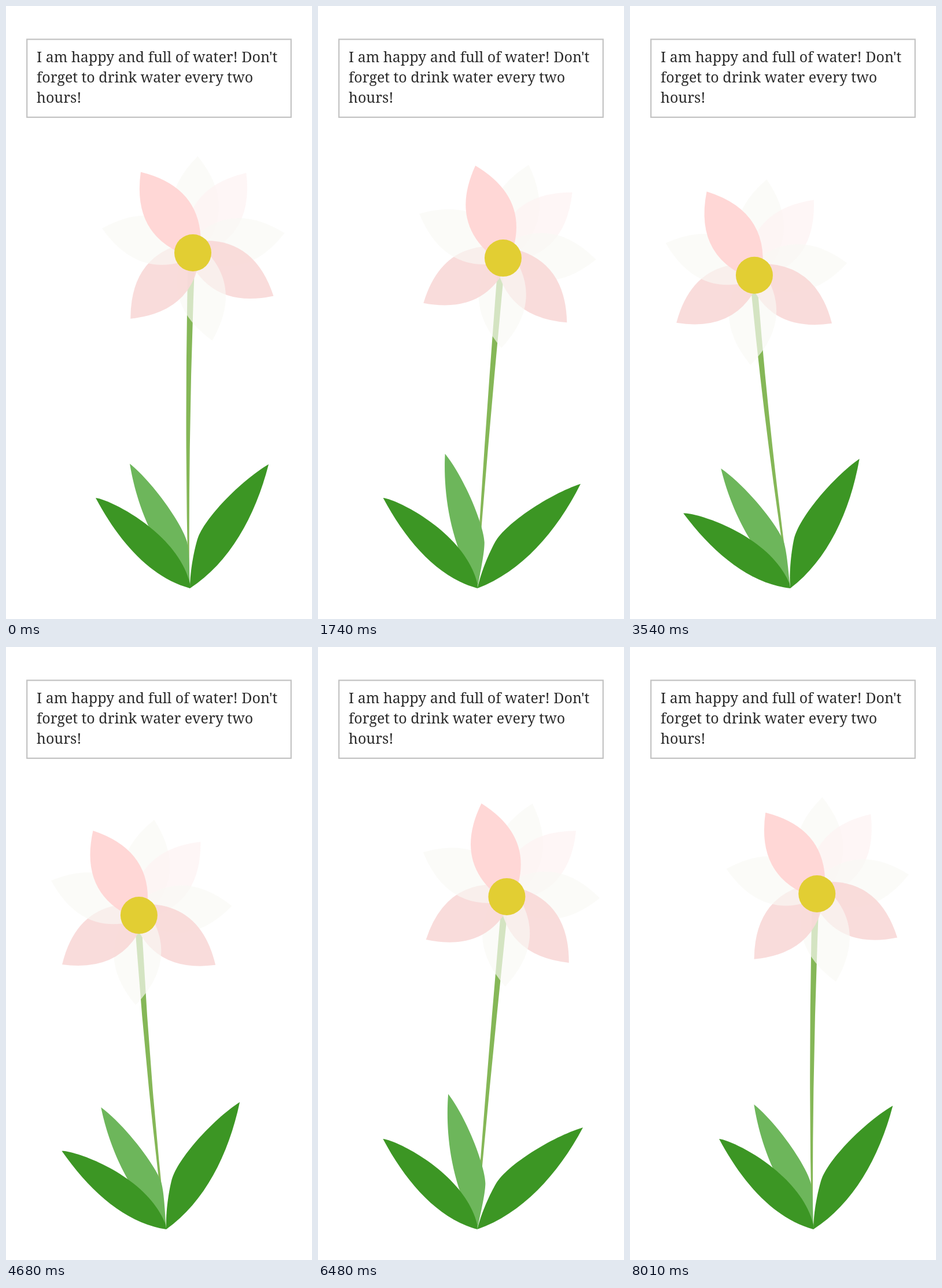
These frames come from a looping animation (529x1058 px, 8.04 s). An HTML page:

```html
<!DOCTYPE html>
<html lang="en">
<head>
<meta charset="utf-8">
<title>Happy flower</title>
<style>
  html, body { margin: 0; width: 100%; height: 100%; overflow: hidden; background: #fff; }
  svg { display: block; width: 100%; height: 100%; }
  text { font: 25px "Noto Serif", serif; fill: #2b2b2b; }
</style>
</head>
<body>
<svg id="stage" viewBox="0 0 529 1058">
  <rect x="36.2" y="57.5" width="456.6" height="134.5" fill="#fff" stroke="#c2c2c2" stroke-width="2.2"/>
  <text x="53" y="97">I am happy and full of water! Don't</text>
  <text x="53" y="132">forget to drink water every two</text>
  <text x="53" y="167">hours!</text>
</svg>
<script>
const LOOP = 8040, STEP = 30, GROUND = 1005;
const stage = document.getElementById("stage");

// Four evenly spaced key poses, played there and back; angles in degrees.
const keys = {
  x: [323, 334.3, 286.2, 175.2],  // flower centre
  y: [426, 425.8, 457, 469],
  foot: [318, 275, 277, 277],
  sway: [0, 15.4, 4.9, -9.4],     // leaves
  lean: [0, 13, 13, 0],           // all petals
  kick: [0, 7, -4, 0],            // pink petals only
  drag: [0, 0, 0, 21]             // hanging petals only
};

const white = { fill: "#f9f9f5", alpha: 0.68 };
const blush = { fill: "#fef3f2", alpha: 0.7 };
const rose = { fill: "#f9dad9", alpha: 0.93, kicks: true };
const pink = { fill: "#ffd6d5", alpha: 0.97, kicks: true };

function add(tag, attrs) {
  const el = document.createElementNS(stage.namespaceURI, tag);
  for (const name in attrs) el.setAttribute(name, attrs[name]);
  return stage.appendChild(el);
}

function place(el, x, y, angle) {
  el.setAttribute("transform", `translate(${x} ${y}) rotate(${angle})`);
}

function mix(values, pos) {
  const i = Math.min(2, Math.floor(pos));
  return values[i] + (values[i + 1] - values[i]) * (pos - i);
}

function petal(kind, rest) {
  const el = add("path", {
    d: "M0 21Q82 -70 0 -161Q-82 -70 0 21Z",
    fill: kind.fill,
    "fill-opacity": kind.alpha
  });
  const hang = Math.max(0, Math.cos((rest - 200) * Math.PI / 180)) ** 2;
  return pose => {
    const angle = rest + pose.lean + (kind.kicks ? pose.kick : 0) + pose.drag * hang;
    place(el, pose.x, pose.y - 6, angle);
  };
}

function leaf(fill, d, turn) {
  const el = add("path", { d, fill });
  return (pose, pos) => place(el, pose.foot, GROUND, mix(keys.sway.map(turn), pos));
}

function stem() {
  const el = add("path", { fill: "#85b757" });
  return pose => {
    const top = pose.x - 2, end = pose.foot - 2, low = GROUND - 5;
    const bend = (top + end) / 2 - 7 + 0.35 * pose.sway;
    const mid = (pose.y + low) / 2;
    el.setAttribute("d",
      `M${top - 6} ${pose.y}Q${bend - 3.5} ${mid} ${end - 1} ${low}` +
      `H${end + 1}Q${bend + 3.5} ${mid} ${top + 6} ${pose.y}Z`);
  };
}

function heart() {
  const el = add("circle", { r: 32, fill: "#e2ce33" });
  return pose => place(el, pose.x, pose.y, 0);
}

// Back to front; petals go clockwise from the top.
const parts = [
  stem(),
  petal(white, 3),
  petal(blush, 35),
  petal(white, 80),
  petal(rose, 120),
  petal(white, 168),
  petal(rose, 222),
  petal(white, 283),
  petal(pink, 326),
  leaf("#6db65b",
    "M0 0C-1 -30 -1 -62 -5 -80C-13 -110 -63 -182 -104 -215C-96 -166 -72 -75 0 0Z",
    a => a),
  leaf("#3c9624",
    "M0 0C-67 -18 -122 -79 -163 -156C-140 -154 -22 -97 0 -8Z",
    a => 1.45 * Math.min(0, a)),
  leaf("#3c9624",
    "M0 0C68 -44 113 -124 136 -214C87 -185 24 -120 13 -85C7 -65 0 -30 0 0Z",
    a => a),
  heart()
];

function draw(time) {
  const t = Math.floor((time % LOOP) / STEP) * STEP;
  const pos = 6 * Math.min(t, LOOP - t) / LOOP;
  const pose = {};
  for (const name in keys) pose[name] = mix(keys[name], pos);
  for (const update of parts) update(pose, pos);
}

const start = performance.now();
function tick() {
  draw(performance.now() - start);
  requestAnimationFrame(tick);
}
tick();
</script>
</body>
</html>
```
